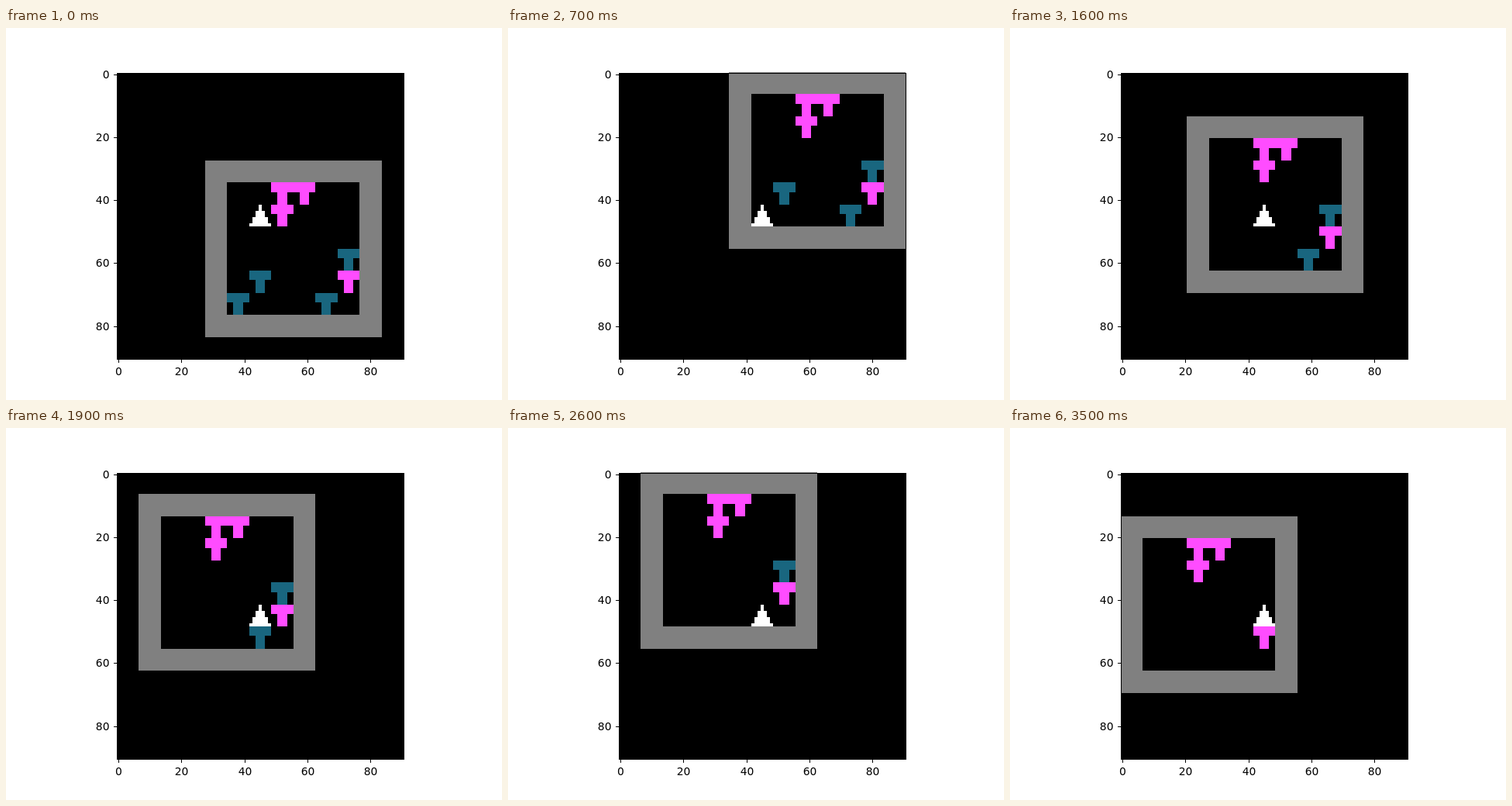
These frames come from a looping animation (640x480 px, 3.6 s). An HTML page:

```html
<!DOCTYPE html>
<html lang="en">
<head>
<meta charset="utf-8">
<title>Grid walk</title>
<style>
  html, body { margin: 0; width: 100%; height: 100%; overflow: hidden; background: #fff; }
  svg { display: block; width: 640px; height: 480px; }
  text { font: 13.889px "DejaVu Sans", sans-serif; }
  path, rect { shape-rendering: crispEdges; }
</style>
</head>
<body>
<svg viewBox="0 0 640 480" xmlns="http://www.w3.org/2000/svg">
  <rect x="143" y="58" width="371" height="370"/>
  <path id="wall" fill="#808080" fill-rule="evenodd"/>
  <path id="pink" fill="#ff4cff"/>
  <path id="teal" fill="#19667f"/>
  <path id="agent" fill="#fff"/>
  <path d="M143.5 58.5H513.5V427.5H143.5Z" fill="none" stroke="#000"/>
  <g id="axes"></g>
</svg>
<script>
const STEP = 100, LOOP = 3600;
const TILE = 7, HOME = 6, ROOM = 8;
const UNIT = 370 / 91;
const $ = id => document.getElementById(id);

// Image pixel index to screen pixel
const px = i => Math.round(143 + i * UNIT);
const py = i => Math.round(57 + i * UNIT);
const box = (x, y, w, h) => `M${px(x)} ${py(y)}H${px(x + w)}V${py(y + h)}H${px(x)}Z`;

// Sprites as [x, y, w, h] inside a 7 x 7 tile
const TEE = [[0, 0, 7, 3], [2, 3, 3, 4]];
const ARROW = [[3, 0, 1, 2], [2, 2, 3, 2], [1, 4, 5, 2], [0, 6, 7, 1]];
const sprite = (parts, cx, cy) =>
  parts.map(([x, y, w, h]) => box(cx * TILE + x, cy * TILE + y, w, h)).join("");

// One letter per step; "." stands still
const MOVES = "LDRDLDDR.RULLURRRRDDLLRRLRLRRLRLUUR";
const DIRS = { L: [-1, 0], R: [1, 0], U: [0, -1], D: [0, 1], ".": [0, 0] };
const PINK = [[2, 0], [3, 0], [2, 1], [5, 4]];
const TEAL = [[5, 3], [1, 4], [0, 5], [4, 5]];
const inside = ([x, y]) => x >= 0 && x < 6 && y >= 0 && y < 6;

// Walking into a teal piece pushes it; against the wall it is removed
function play() {
  let pos = [1, 1], teal = TEAL;
  const states = [{ pos, teal }];
  for (const m of MOVES) {
    const [dx, dy] = DIRS[m];
    pos = [pos[0] + dx, pos[1] + dy];
    teal = teal
      .map(([x, y]) => x === pos[0] && y === pos[1] ? [x + dx, y + dy] : [x, y])
      .filter(inside);
    states.push({ pos, teal });
  }
  return states;
}
const states = play();

function render(ms) {
  const { pos, teal } = states[Math.floor((ms % LOOP) / STEP)];
  // The view stays centred on the agent
  const ox = HOME - pos[0], oy = HOME - pos[1];
  const tees = list => list.map(([x, y]) => sprite(TEE, ox + x, oy + y)).join("");
  const square = (inset, size) =>
    box((ox - 1 + inset) * TILE, (oy - 1 + inset) * TILE, size * TILE, size * TILE);
  $("wall").setAttribute("d", square(0, ROOM) + square(1, ROOM - 2));
  $("pink").setAttribute("d", tees(PINK));
  $("teal").setAttribute("d", tees(teal));
}

function drawAxes() {
  let out = "";
  for (let v = 0; v <= 80; v += 20) {
    const off = (v + 0.5) * 369.6 / 91;
    const x = Math.round(143.2 + off), y = Math.round(57.6 + off);
    out += `<rect x="${x}" y="428" width="1" height="4"/>`
      + `<rect x="139" y="${y}" width="4" height="1"/>`
      + `<text x="${x + 0.5}" y="448" text-anchor="middle">${v}</text>`
      + `<text x="133.5" y="${y + 5}" text-anchor="end">${v}</text>`;
  }
  $("axes").innerHTML = out;
}

drawAxes();
$("agent").setAttribute("d", sprite(ARROW, HOME, HOME));
const start = performance.now();
function tick() {
  render(performance.now() - start);
  requestAnimationFrame(tick);
}
tick();
</script>
</body>
</html>
```
